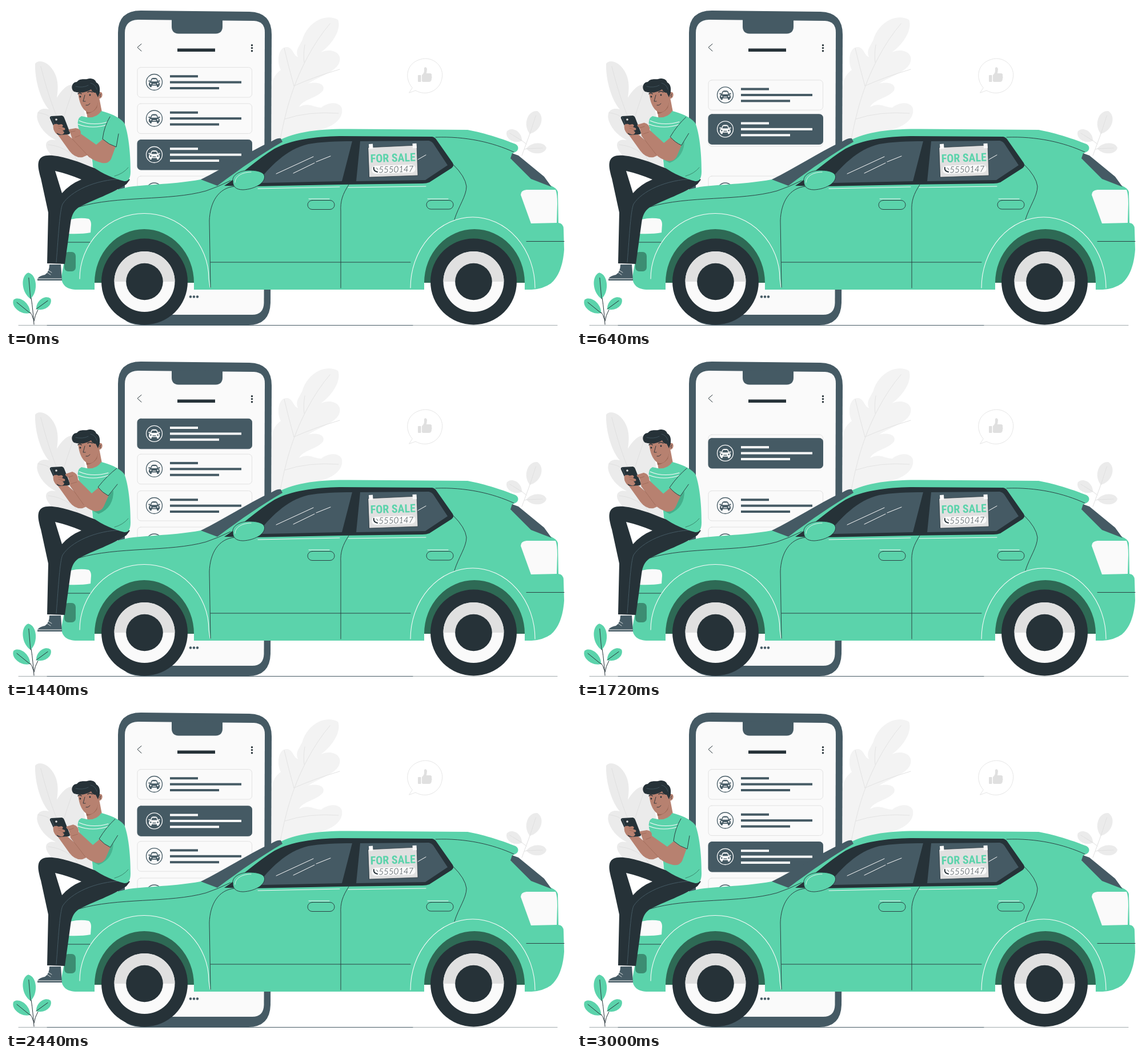
Recreate the animation shown at these times as an HTML page with a canvas. Size 989x566 px, loop 5 s.

```html
<!DOCTYPE html>
<html lang="en">
<head>
<meta charset="utf-8">
<title>Car for sale</title>
<style>
html, body { margin: 0; width: 100%; height: 100%; overflow: hidden; background: #fff; }
canvas { display: block; width: 989px; height: 566px; }
</style>
</head>
<body>
<canvas id="stage" width="989" height="566"></canvas>
<script>
const ctx = document.getElementById('stage').getContext('2d');
const GREEN = '#5bd3ab', DEEP = '#2e6a55', SLATE = '#455a64', INK = '#263238';
const PAPER = '#fafafa', GREY = '#e0e0e0', PALE = '#f3f3f3', LEAF = '#ebebeb';
const SKIN = '#b78170', SHADE = '#996554';
const LOOP = 5000, STEP = 40;
const SLOT = [107.5, 171, 234.5, 298];

const fill = (d, color) => { ctx.fillStyle = color; ctx.fill(new Path2D(d)); };
const line = (d, color = INK, w = 1) => {
  ctx.strokeStyle = color;
  ctx.lineWidth = w;
  ctx.stroke(new Path2D(d));
};
const disc = (x, y, r, color, from = 0, to = Math.PI * 2) => {
  ctx.fillStyle = color;
  ctx.beginPath();
  ctx.arc(x, y, r, from, to);
  ctx.fill();
};
const box = (x, y, w, h, r, color, stroke, lw = 1) => {
  ctx.beginPath();
  ctx.roundRect(x, y, w, h, r);
  if (color) { ctx.fillStyle = color; ctx.fill(); }
  if (stroke) { ctx.strokeStyle = stroke; ctx.lineWidth = lw; ctx.stroke(); }
};
const mix = (a, b, k) => a + (b - a) * k;
const ease = (t, start) => {
  const p = Math.min(1, Math.max(0, (t - start) / 600));
  return p * p * (3 - 2 * p);
};

// A pointed leaf with a central vein, growing from (x, y) at the given angle.
function leaf(x, y, len, wide, angle, color, vein) {
  ctx.save();
  ctx.translate(x, y);
  ctx.rotate(angle * Math.PI / 180);
  fill(`M0 0 C${-wide} ${-len * 0.25} ${-wide} ${-len * 0.9} 0 ${-len} C${wide} ${-len * 0.9} ${wide} ${-len * 0.25} 0 0Z`, color);
  line(`M0 0 V${-len * 0.8}`, vein, 0.9);
  ctx.restore();
}

function backdrop() {
  fill('M51 101 C57 93 71 98 79 108 C92 124 92 142 89 161 C96 149 105 139 114 138 L132 150 L152 284 L127 290 C102 276 85 270 75 256 C64 240 73 232 87 235 C74 228 62 218 56 202 C51 187 58 177 75 181 C61 166 50 130 51 101Z', LEAF);
  line('M61 106 C72 150 88 205 136 292 M56 187 C72 189 83 195 92 211 M117 147 C108 175 101 190 96 218 M74 243 Q96 245 113 258', GREY);

  fill('M464 240 L465 142 C467 125 472 119 481 112 C473 96 477 71 492 72 C503 73 503 88 511 89 C505 75 517 68 520 55 C530 29 558 12 581 24 C588 40 571 68 551 81 C570 73 588 82 584 97 C580 115 548 123 529 136 C543 132 560 136 555 148 C544 162 520 163 513 177 C530 168 539 178 552 178 C568 165 592 169 588 187 C585 205 561 216 540 219 L490 238Z', PALE);
  line('M479 240 C488 190 500 142 527 91 Q545 57 567 31 M504 140 Q495 108 487 74 M504 140 Q540 124 584 111 M488 198 Q530 184 582 188 M522 99 Q520 85 523 68', '#e3e3e3');

  line('M903 262 Q917 226 929 187 M911 242 Q895 229 880 222 M908 251 Q925 244 942 249', GREY);
  leaf(917, 224, 42, 17, 18, LEAF, GREY);
  leaf(903, 236, 31, 13, -58, LEAF, GREY);
  leaf(911, 250, 35, 12, 88, LEAF, GREY);

  line('M711 143 C697 127 701 103 721 95 C744 85 766 103 763.5 124 C761 149 735 159 717 148 L706 152Z', '#e6e6e6', 1);
  box(721, 121, 5.5, 12, 1, GREY);
  fill('M728 121 C733 117 732 113 732 109 C733 106 737 107 737 111 L736 118 H743 Q746 119 745 122 Q746 125 745 127 Q745 133 740 133 H730 L728 132Z', GREY);
}

function carIcon(x, y, color, back) {
  ctx.strokeStyle = color;
  ctx.lineWidth = 1.3;
  ctx.beginPath();
  ctx.arc(x, y, 14, 0, 7);
  ctx.stroke();
  ctx.save();
  ctx.translate(x, y);
  fill('M-7 -1 L-5 -6 Q-4 -7.5 -2 -7.5 H2 Q4 -7.5 5 -6 L7 -1 Q9.5 0 9.5 3 V6 H8 V8 Q6 9.5 4.5 8 V6 H-4.5 V8 Q-6 9.5 -8 8 V6 H-9.5 V3 Q-9.5 0 -7 -1Z M-10 -3 H-7 V-1 H-10Z M7 -3 H10 V-1 H7Z', color);
  fill('M-5.3 -1.2 L-3.6 -5.3 H3.6 L5.3 -1.2Z', back);
  disc(-6.2, 2.4, 1.3, back);
  disc(6.2, 2.4, 1.3, back);
  fill('M-3 3 H3 V4.3 H-3Z', back);
  ctx.restore();
}

function card(y, dark) {
  const back = dark ? SLATE : PAPER, front = dark ? PAPER : SLATE;
  box(230, y, 200.5, 52.5, 6, back, dark ? SLATE : '#e2e2e2');
  carIcon(259.5, y + 26, front, back);
  ctx.fillStyle = front;
  [49, 125, 86].forEach((w, i) => ctx.fillRect(287, y + 13.7 + i * 10.4, w, 4));
}

function phone(t) {
  fill('M236 8 L426 10 Q465 11 465 50 L463 520 Q462 559 424 559 H236 Q196 558 196 518 V47 Q196 8 236 8Z', SLATE);
  fill('M231 24 L434 26 Q453 27 453 46 L451.5 520 Q451 541 431 541 H230 Q208 540 208 518 V47 Q208 25 231 24Z', PAPER);
  fill('M290 23 V36 Q290 48 302 48.5 H367 Q379 48 379 36 V24Z', SLATE);
  line('M237 66.5 L230 72.5 L237 79', INK, 1);
  ctx.fillStyle = INK;
  ctx.fillRect(300, 74.5, 66, 5.5);
  [68.7, 73.6, 78.7].forEach(y => disc(430.5, y, 1.7, INK));
  [323, 329, 335].forEach(x => disc(x, 509.5, 2.2, SLATE));

  const a = ease(t, 400), b = ease(t, 1400), c = ease(t, 2400), gap = 63.5;
  card(SLOT[3], false);
  card(SLOT[1] + gap * (a - c), false);
  card(SLOT[0] + gap * (a - b), false);
  card(SLOT[2] + gap * (b + c - 2 * a), true);
}

function wheel(x) {
  disc(x, 483, 75.5, INK);
  disc(x, 483, 53, PAPER);
  disc(x, 483, 53, GREY, Math.PI, 0);
  disc(x, 483, 32.3, INK);
}

function sign() {
  fill('M634 248 L719 244 L721 297 L636 300Z', GREY);
  line('M634 248 L719 244 L721 297 L636 300Z', INK, 0.7);
  fill('M635 242 L642 241.5 L642.5 250 L635.5 250.5Z M711.5 241 L718.5 240.7 L719 249 L712 249.3Z', PAPER);
  ctx.save();
  ctx.translate(677.5, 273);
  ctx.rotate(-0.03);
  ctx.textAlign = 'center';
  ctx.fillStyle = GREEN;
  // The headline takes the largest size that fits the board.
  const headline = size => `bold condensed ${size}px "Roboto Condensed", Roboto, "Liberation Sans", sans-serif`;
  ctx.font = headline(20);
  ctx.font = headline(Math.min(32, 20 * 79 / ctx.measureText('FOR SALE').width));
  ctx.fillText('FOR SALE', 0, 0);
  box(-38, 6, 77, 14, 7, PAPER);
  line('M-34 9 Q-35 15 -28 17', INK, 2);
  line('M-29.5 10 Q-27 11 -27 13', INK, 0.7);
  ctx.fillStyle = INK;
  ctx.font = 'italic 300 15px Lato, "Liberation Sans", sans-serif';
  ctx.fillText('5550147', 5, 18.5);
  ctx.restore();
}

function car() {
  fill('M112 362 C135 344 174 325 215 317 C258 312 310 311 345 303 L385 300 L470 240 C500 221 545 215 600 215.5 L808 217 C840 223 872 234 892 242 C899 246 898 255 888 257 L884 268 L954 315 Q964 319 966 326 L967 380 Q976 381 976 391 L977 427 C975 455 967 475 954 486 Q940 496 920 497 H908 V485 H732 V497 H329 V485 H155 V497 H125 C106 497 97 489 97 474 L103 441 L105 382Z', GREEN);
  fill('M341 304 C382 284 420 258 465 237 Q475 231 481 232 L484 238 C447 259 413 283 370 315Z', SLATE);
  fill('M886 258 L883 267 L919 303 L955 317 L942 299 L897 262Z', SLATE);

  fill('M155 485 A87 94 0 0 1 329 485Z M732 485 A88 94 0 0 1 908 485Z', DEEP);
  line('M129 478 A113 114.5 0 0 1 355 478 L357 493 M708 494 A109 124 0 0 1 926 494', PAPER, 1.1);
  wheel(242.5);
  wheel(818.5);

  fill('M382 315 C410 297 440 268 470 250 C500 234 540 229 584 228 L746 229 Q751 230 754 235 L782 275 Q785 280 780 284 L741 309 Q736 311 729 311 L580 313 L434 316Z', INK);
  fill('M440 309 C461 283 490 251 529 242 C550 238 580 237 606 237 L588 307 L450 310Z M620 237 L740 236 Q745 237 748 241 L773 279 L734 305 L613 307Z', SLATE);
  line('M473 294 L538 264 M503 293 L540 275 M543 273 L568 263 M721 269 L735 261', PAPER, 1);

  line('M128 352 C194 332 286 342 350 324 Q371 317 393 306 M401 316 C371 318 357 345 356 376 L358 493 M358 449 H708 M600 313 C589 330 585 342 586 360 V494 M783 278 Q804 299 806 316 C806 333 792 351 785 374 M752 230 C805 228 852 239 889 256 M108 414 H147 M911 412.5 H977', INK, 0.9);
  line('M441 320 L584 317 M599 318 L735 316 M530 338 H566 M738 338 H774', PAPER, 1);
  const mirror = 'M397 307 C395 296 410 288 426 288 C440 288 453 291 452.5 300 C452 311 435 321 415 322 C402 322 397 316 397 307Z';
  fill(mirror, GREEN);
  line(mirror, INK, 0.9);
  line('M401 309 C401 298 414 291 429 291', PAPER, 0.8);
  box(528, 340.5, 47, 16, 8, null, INK, 0.9);
  box(736, 340.5, 47, 15.5, 8, null, INK, 0.9);

  fill('M113 374 Q130 370 145 373 Q149 376 149 383 L148 397 Q133 400 107 399Z', PAPER);
  fill('M901 331 Q901 323 911 322 H962 Q965 329 965 346 L964 380 L919 381Z', PAPER);
  box(102, 431, 20, 34, 7, '#3c8d72');
  sign();
}

function plant() {
  line('M49 558 Q47 525 40 486 M48 549 Q45 533 24 522 M49 552 Q52 532 70 514', INK, 1);
  leaf(43, 513, 46, 15, -5, GREEN, INK);
  leaf(42, 538, 37, 13, -51, GREEN, INK);
  leaf(53, 531, 31, 12, 54, GREEN, INK);
}

function head() {
  fill('M139 174 L143 199 Q157 200 168 186 L163 160Z', SKIN);
  fill('M140 184 Q154 184 161 169 L159 178 Q153 187 141 189Z', SHADE);
  fill('M126 145 C126 162 131 179 141 185 C151 190 161 179 162 162 C170 164 171 149 164 151 L158 139 L128 143Z', SKIN);
  fill('M119 150 C112 144 116 133 124 133 C129 126 138 129 142 128 C151 125 157 130 158 134 C166 138 164 149 164 152 L161 160 L157 152 Q151 152 149 146 Q135 155 119 150Z', INK);
  line('M122 141 Q134 144 144 139 M148 135 Q157 137 159 146', SLATE, 0.8);
  disc(130, 159, 1.4, INK);
  disc(147, 156, 1.4, INK);
  line('M126 154 Q129 151 132 154 M143 151 Q147 148 151 151', INK, 1.5);
  line('M138 156 L135 167 L139 167 M140 174 Q144 175 147 171 M166 154 Q163 156 165 159', INK, 0.9);
}

// Each number pair is the low pose, then the high pose.
function armPath(k, low, high) {
  let i = 0;
  return low.replace(/\d+/g, n => mix(+n, high[i++], k).toFixed(2));
}

function man(t) {
  fill('M149 282 C116 268 78 257 64 264 C53 270 56 284 61 302 L74 362 L72 451 L103 452 L113 380 Q115 361 127 353 C151 340 188 328 211 312 L217 304Z', INK);
  fill('M86 289 Q108 294 132 304 Q112 312 98 328Z', '#fff');
  line('M204 303 C155 304 113 325 99 347 C94 359 92 400 88 449', SLATE, 1);
  fill('M76 453 L96 453 L98 481 H55 Q54 474 68 471 Q76 466 76 453Z', SLATE);
  line('M56 478 H97', PAPER, 1);
  line('M74 463 L80 467 M72 467 L78 471', PAPER, 0.8);

  // far arm, holding the phone
  fill('M104 222 L128 243 L152 250 L150 258 L134 265 Q121 267 111 254 L91 226 C83 221 80 211 88 205 Q99 207 104 222Z', SKIN);
  head();
  fill('M132 193 Q124 197 126 210 L134 237 Q151 251 152 282 C169 294 190 303 207 307 Q218 308 218 290 C218 255 214 222 207 205 C197 193 181 188 167 184 Q158 197 142 195Z', GREEN);
  line('M128 201 Q151 211 179 203 M126 207 Q151 217 181 207', PAPER, 1.1);
  line('M190 298 Q205 294 214 283', DEEP, 0.7);

  fill('M79 193 L98 192 Q101 193 102 196 L112 222 Q112 225 108 225 L94 226 Q90 226 89 223 L77 197 Q76 194 79 193Z', INK);
  line('M79 194 L91 223 Q92 226 95 226', SLATE, 1);
  disc(88, 199, 1.8, GREY);
  fill('M83 208 Q88 205 92 208 L97 207 Q102 209 98 212 L103 214 Q105 218 99 218 L102 221 Q101 226 95 225 L88 222 Q81 216 83 208Z', SKIN);
  line('M91 210 L98 212 M92 214 L101 217', SHADE, 0.7);

  const rise = 1 - (1 - ease(t, 400)) ** 3;
  const k = rise - 0.25 * ease(t, 1400) - 0.75 * ease(t, 2400);
  ctx.globalAlpha = k;
  fill('M178 241 L188 233 Q189 264 162 275 L153 270Z', '#42ab88');
  ctx.globalAlpha = 1;
  fill(armPath(k,
    'M131 224 L158 243 L171 232 L192 246 L184 268 Q179 277 168 275 Q153 271 146 265 L116 233 L112 221 Q108 218 111 216 L122 214 Q132 215 131 224Z',
    [126, 215, 150, 239, 163, 228, 180, 242, 171, 262, 166, 272, 154, 270, 142, 266, 136, 259, 112, 225, 109, 211, 103, 208, 104, 205, 116, 201, 126, 204, 126, 215]), SKIN);
  line(armPath(k, 'M112 221 L121 219 M121 230 L129 227 M116 233 L146 265',
    [109, 211, 117, 208, 114, 222, 124, 219, 112, 225, 136, 259]), SHADE, 0.7);
  fill(armPath(k, 'M182 194 Q172 210 169 233 Q180 243 193 247 L200 220Z',
    [194, 195, 177, 208, 161, 228, 169, 238, 179, 243, 201, 220]), GREEN);
  line(armPath(k, 'M182 194 Q172 210 169 233 Q180 243 193 247 L197 224',
    [194, 195, 177, 208, 161, 228, 169, 238, 179, 243, 195, 223]), INK, 0.9);
}

function draw(t) {
  ctx.fillStyle = '#fff';
  ctx.fillRect(0, 0, 989, 566);
  backdrop();
  phone(t);
  line('M22 559.5 H965', '#a3abae', 1);
  line('M72 559.5 H712', SLATE, 1);
  car();
  plant();
  man(t);
}

ctx.lineJoin = ctx.lineCap = 'round';
const start = performance.now();
function tick() {
  const t = (performance.now() - start) % LOOP;
  draw(Math.floor(t / STEP) * STEP);
  requestAnimationFrame(tick);
}
tick();
</script>
</body>
</html>
```
